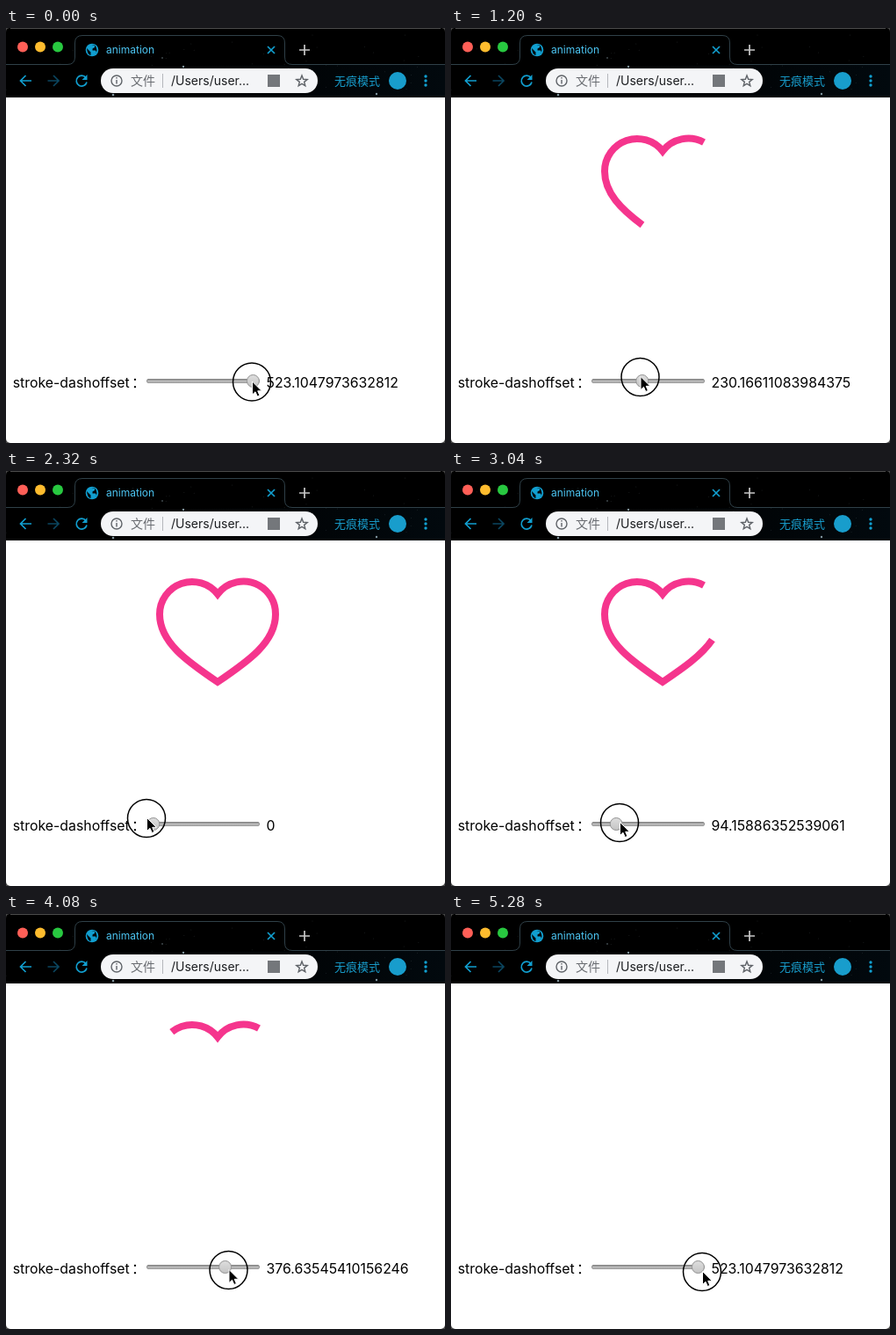
An HTML page that plays this animation: 500x472 px, repeating every 5360 ms.

```html
<!DOCTYPE html>
<html lang="zh-CN">
<head>
<meta charset="utf-8">
<title>animation</title>
<style>
  html, body { margin: 0; width: 100%; height: 100%; overflow: hidden; background: #fff; }
  svg { display: block; width: 500px; height: 472px; }
  text { font-family: Inter, "Noto Sans CJK SC", "Noto Sans CJK", sans-serif; white-space: pre; }
  .line { fill: none; stroke-width: 1.7; }
  .blue { stroke: #119fd0; }
  .grey { stroke: #5f6368; stroke-width: 1.4; }
  .page { font-size: 15.85px; fill: #000; }
</style>
</head>
<body>
<svg viewBox="0 0 500 472">
  <defs>
    <linearGradient id="sky">
      <stop offset=".4" stop-color="#000"/>
      <stop offset="1" stop-color="#02090e"/>
    </linearGradient>
    <linearGradient id="groove" x2="0" y2="1">
      <stop offset="0" stop-color="#9c9c9c"/>
      <stop offset="1" stop-color="#c6c6c6"/>
    </linearGradient>
    <linearGradient id="knobFill" x2="0" y2="1">
      <stop offset="0" stop-color="#dedede"/>
      <stop offset="1" stop-color="#c4c4c4"/>
    </linearGradient>
  </defs>

  <!-- window -->
  <rect width="500" height="472" fill="#444"/>
  <rect y="40" width="500" height="432" rx="5" fill="#fff"/>
  <path d="M0 79V5Q0 0 5 0H495Q500 0 500 5V79Z" fill="#000"/>
  <rect y="42" width="500" height="37" fill="url(#sky)"/>
  <path d="M5 .5H495" stroke="#4b4b4b"/>
  <g id="stars" fill="#b9d4df"></g>

  <!-- tab strip -->
  <path d="M0 41.5H70Q78.5 41.5 78.5 33V17Q78.5 8.5 87 8.5H309Q317.5 8.5 317.5 17V33Q317.5 41.5 326 41.5H500" fill="none" stroke="#2f4048"/>
  <circle cx="19" cy="21.5" r="6" fill="#ff5f57"/>
  <circle cx="39" cy="21.5" r="6" fill="#febc2e"/>
  <circle cx="59" cy="21.5" r="6" fill="#28c840"/>
  <circle cx="98" cy="25" r="7.3" fill="#119fd0"/>
  <path d="M92 23l4.5 4.5v3.5q-4-1-4.5-8ZM97 19.5h4v2.5l-2.5 1.5v2h3.5l1 2-1 2q3-5-.5-9.5Z" fill="#02080c"/>
  <text x="114" y="29.3" font-size="12" fill="#4cc4f1">animation</text>
  <path class="line blue" d="M298 21l8 8m0-8l-8 8"/>
  <path class="line" stroke="#c8c8c8" d="M340 19v12m-6-6h12"/>

  <!-- toolbar -->
  <path class="line blue" d="M29 60H16.5m6-6l-6 6 6 6"/>
  <path class="line" stroke="#0b4660" d="M47.5 60H60m-6-6l6 6-6 6"/>
  <path class="line blue" d="M91 56.5A6 6 0 1 0 92 61.5"/>
  <path d="M92.5 53v6h-6Z" fill="#119fd0"/>
  <rect x="108" y="46" width="247" height="28" rx="14" fill="#f4f5f7"/>
  <circle class="line grey" cx="126" cy="60" r="6"/>
  <path class="line grey" d="M126 59v4.5m0-7.5v1.5"/>
  <text x="142" y="65" font-size="14" fill="#6a6d72">文件</text>
  <path d="M178.5 52v16" stroke="#b4b7bb"/>
  <text x="188" y="65" font-size="14" fill="#1c1e21">/Users/user...</text>
  <rect x="298" y="53" width="14" height="14" fill="#74777b"/>
  <path id="bookmark" class="line grey"/>
  <text x="374" y="65" font-size="13" fill="#189dcc">无痕模式</text>
  <circle cx="446" cy="60" r="10" fill="#189dcc"/>
  <g fill="#119fd0">
    <circle cx="478" cy="55" r="1.7"/><circle cx="478" cy="60" r="1.7"/><circle cx="478" cy="65" r="1.7"/>
  </g>

  <!-- page -->
  <path id="heart" fill="none" stroke="#f5358d" stroke-width="8" pathLength="100" stroke-dasharray="100 200"
    d="M288 130A37 37 0 0 0 241 140A37 37 0 0 0 175 163C175 195 207 217 241 240C275 217 307 195 307 163A37 37 0 0 0 288 130"/>
  <text class="page" x="7.7" y="409">stroke-dashoffset</text>
  <text class="page" x="143" y="409">：</text>
  <rect x="160.5" y="399.5" width="128" height="4" rx="1.5" fill="url(#groove)" stroke="#999"/>
  <path d="M161.5 399.5h126" stroke="#808080"/>
  <circle id="knob" cy="401.5" r="7" fill="url(#knobFill)" stroke="#929292"/>
  <text id="value" class="page" x="296.5" y="409"></text>
  <g id="pointer">
    <circle r="21.5" fill="none" stroke="#000" stroke-width="1.5"/>
    <path d="M.5-.5V14.5L4 11.3 6.3 16.5 8.9 15.4 6.7 10.3H11.3Z" stroke="#fff"/>
  </g>
</svg>
<script>
  const LOOP = 5360, TICK = 80, LENGTH = 523.1047973632812;
  const el = id => document.getElementById(id);

  // time, pointer x, pointer y, slider share
  const keys = [
    [0, 280, 402.5, 1],
    [480, 261.4, 399.5, .83],
    [1200, 215.5, 397, .44],
    [1680, 180, 396, .11],
    [1960, 160, 395, 0],
    [2320, 160, 395, 0],
    [2640, 170, 398, 0],
    [3040, 192, 400, .18],
    [4080, 253.5, 405, .72],
    [4640, 286, 407.5, 1],
    [5280, 286, 407, 1]
  ];

  function slope(i, col) {
    const a = keys[Math.max(i - 1, 0)], b = keys[Math.min(i + 1, keys.length - 1)];
    return (b[col] - a[col]) / (b[0] - a[0]);
  }

  // cubic Hermite, kept between its two keys
  function sample(t, col) {
    let i = keys.length - 2;
    while (keys[i][0] > t) i--;
    const a = keys[i], b = keys[i + 1], span = b[0] - a[0];
    const u = (t - a[0]) / span, w = 1 - u;
    const y = w * w * (1 + 2 * u) * a[col] + u * u * (3 - 2 * u) * b[col]
      + span * u * w * (w * slope(i, col) - u * slope(i + 1, col));
    return Math.min(Math.max(y, Math.min(a[col], b[col])), Math.max(a[col], b[col]));
  }

  function draw(t) {
    const n = Math.round(sample(t, 3) * 100);
    el("heart").setAttribute("stroke-dashoffset", n);
    el("heart").style.visibility = n < 100 ? "visible" : "hidden";
    el("knob").setAttribute("cx", 167.8 + 1.136 * n);
    el("value").textContent = LENGTH * (n / 100);
    el("pointer").setAttribute("transform", `translate(${sample(t, 1)} ${sample(t, 2)})`);
  }

  function decorate() {
    let tips = "";
    for (let i = 0; i < 10; i++) {
      const r = i % 2 ? 2.8 : 6.5, a = (i * 36 - 90) * Math.PI / 180;
      tips += `${i ? "L" : "M"}${337 + r * Math.cos(a)} ${60.5 + r * Math.sin(a)}`;
    }
    el("bookmark").setAttribute("d", tips + "Z");

    const bright = [[202, 44, 1.2], [122, 76, 1.3], [422, 75, 1.2], [178, 34, .7]];
    let seed = 7;
    const random = () => (seed = seed * 16807 % 2147483647) / 2147483647;
    const dot = (x, y, r, o) => `<circle cx="${x}" cy="${y}" r="${r}" opacity="${o}"/>`;
    let sky = bright.map(s => dot(...s, .7)).join("");
    for (let i = 0; i < 40; i++) sky += dot(random() * 500, 4 + random() * 72, .5, .15);
    el("stars").innerHTML = sky;
  }

  function frame(now) {
    const t = now % LOOP;
    draw(t - t % TICK);
    requestAnimationFrame(frame);
  }

  decorate();
  draw(0);
  requestAnimationFrame(frame);
</script>
</body>
</html>
```
